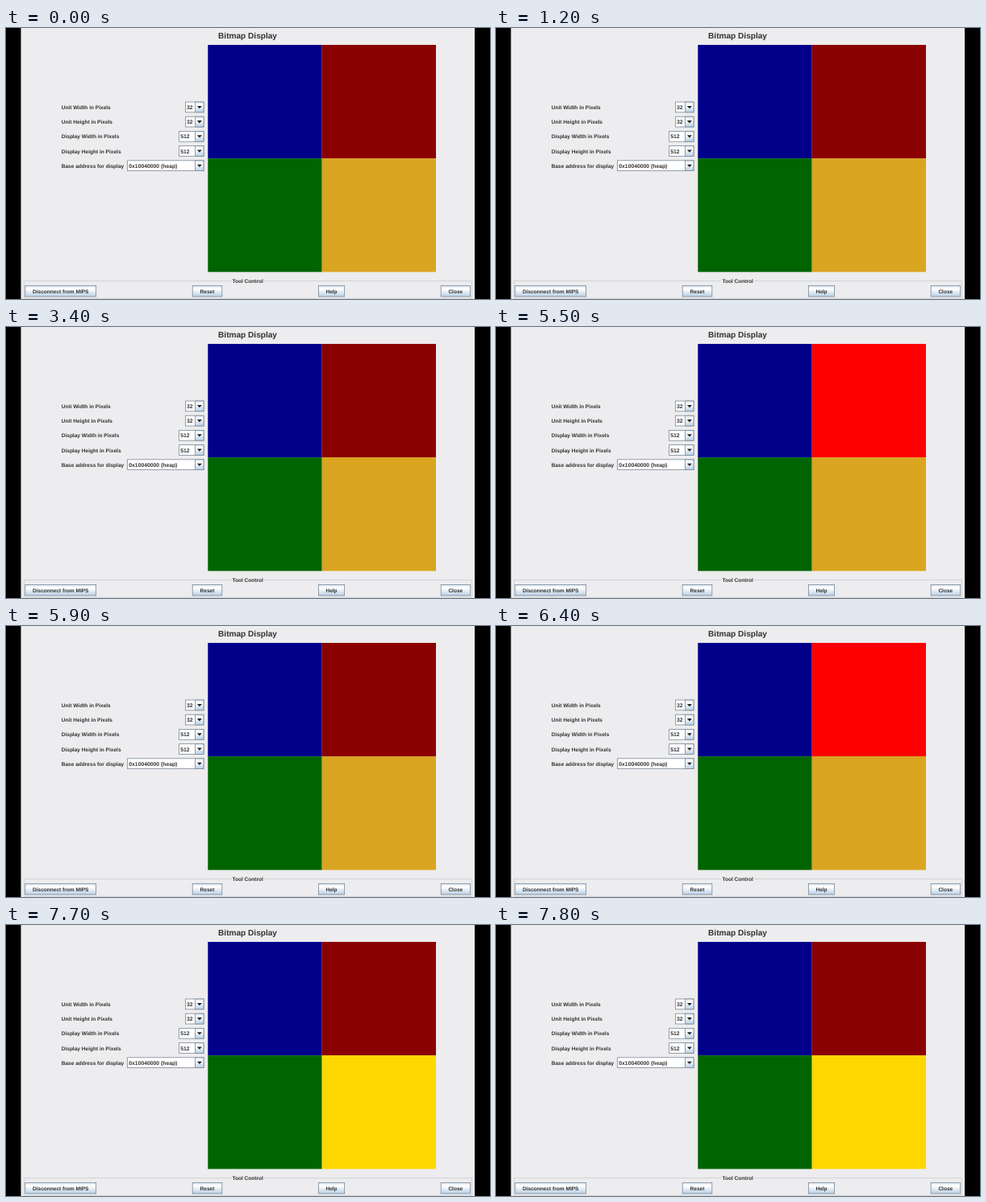
An HTML page for the animation above (8000 ms loop, 600 by 337 pixels).

```html
<!DOCTYPE html>
<html lang="en">
<head>
<meta charset="utf-8">
<title>Bitmap Display</title>
<style>
  html, body { margin: 0; width: 100%; height: 100%; overflow: hidden; background: #000; }
  svg { display: block; width: 600px; height: 337px; }
  text { font: bold 6.55px "Liberation Sans", Arial, sans-serif; fill: #333; text-rendering: geometricPrecision; }
  .title { font-size: 10.1px; }
  .value { font-size: 6.8px; }
  .mid { text-anchor: middle; }
  .edge { stroke: #7a8a99; stroke-width: .8; }
  .groove { fill: none; stroke: #c4c9ce; stroke-width: .7; }
</style>
</head>
<body>
<svg id="stage" viewBox="0 0 600 337">
  <defs>
    <linearGradient id="steel" x2="0" y2="1">
      <stop offset="0" stop-color="#dde8f3"/>
      <stop offset=".3" stop-color="#fff"/>
      <stop offset="1" stop-color="#b8cfe5"/>
    </linearGradient>
  </defs>
  <rect width="600" height="337"/>
  <rect x="18.5" width="562.5" height="337" fill="#edecee"/>
  <text class="title mid" x="299.5" y="12.8">Bitmap Display</text>
  <rect x="250.3" y="21" width="141.4" height="141.4" fill="#00008b"/>
  <rect id="red" x="391.7" y="21" width="141.3" height="141.4"/>
  <rect x="250.3" y="162.2" width="141.4" height="141.2" fill="#006400"/>
  <rect id="yellow" x="391.7" y="162.2" width="141.3" height="141.2"/>
  <path class="groove" d="M279 314.6H22.4V336.4H577.4V314.6H320"/>
  <text class="mid" x="299.6" y="317.2">Tool Control</text>
  <g id="controls"></g>
</svg>
<script>
  const $ = id => document.getElementById(id);

  const combo = ([label, value, left], i) => {
    const y = 98.4 + i * 18.2;
    return `<text x="68.7" y="${y + 2.5}">${label}</text>
      <rect class="edge" x="${left}" y="${y - 6.4}" width="${245 - left}" height="12.8" fill="#fff"/>
      <rect class="edge" x="234.6" y="${y - 6.4}" width="10.4" height="12.8" fill="url(#steel)"/>
      <path d="M236.9 ${y - 1.5}h6l-3 3.3z" fill="#222"/>
      <text class="value" x="${left + 1.7}" y="${y + 2.6}">${value}</text>`;
  };

  const button = ([label, x, width]) =>
    `<rect class="edge" x="${x}" y="320.5" width="${width}" height="13.5" fill="url(#steel)"/>
     <text class="mid" x="${x + width / 2}" y="329.7">${label}</text>`;

  $('controls').innerHTML = [
    ['Unit Width in Pixels', '32', 222.4],
    ['Unit Height in Pixels', '32', 222.4],
    ['Display Width in Pixels', '512', 214.6],
    ['Display Height in Pixels', '512', 214.6],
    ['Base address for display', '0x10040000 (heap)', 150.6]
  ].map(combo).join('') + [
    ['Disconnect from MIPS', 23.8, 87.8],
    ['Reset', 231.2, 36.6],
    ['Help', 387.4, 32.2],
    ['Close', 539.2, 36.2]
  ].map(button).join('');

  const within = (t, from, to) => t >= from && t < to;

  function draw() {
    const t = performance.now() % 8000;
    const redLit = within(t, 5500, 5900) || within(t, 6400, 7200);
    $('red').setAttribute('fill', redLit ? '#f00' : '#8b0000');
    $('yellow').setAttribute('fill', t >= 7700 ? '#ffd700' : '#daa520');
    requestAnimationFrame(draw);
  }
  draw();
</script>
</body>
</html>
```
